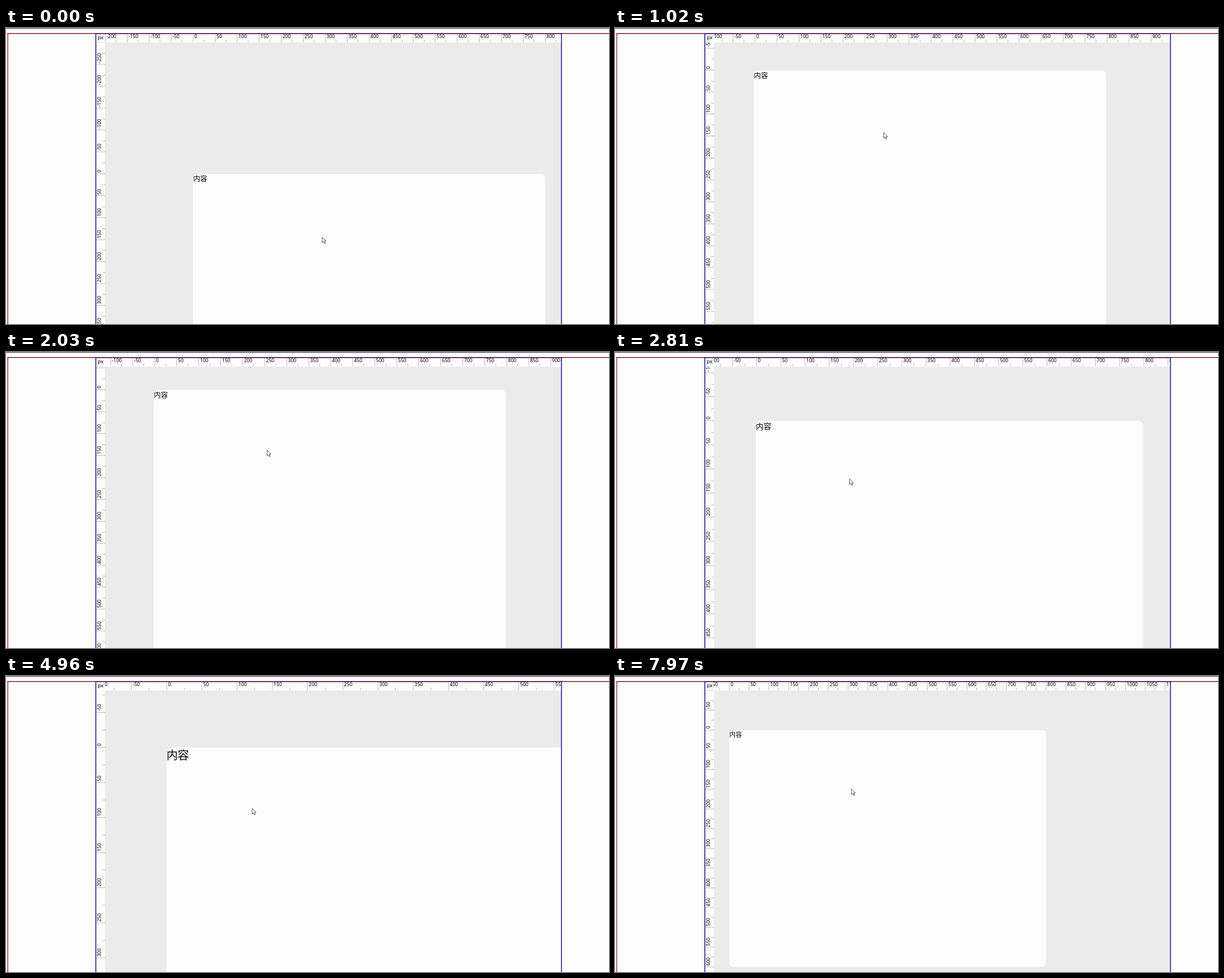
An HTML page with a canvas that plays this animation: 1066x525 px, repeating every 8000 ms.

```html
<!DOCTYPE html>
<html lang="zh">
<head>
<meta charset="utf-8">
<title>Canvas ruler</title>
<style>
  html, body { margin: 0; width: 100%; height: 100%; overflow: hidden; background: #fdfdfd; }
  canvas { display: block; }
</style>
</head>
<body>
<canvas id="stage" width="1066" height="525"></canvas>
<script>
const ctx = document.getElementById('stage').getContext('2d');
const LOOP = 8000, UNIT = 0.778, WHITE = '#fdfdfd';
const LEFT = 175, TOP = 25.5, RIGHT = 981, BOTTOM = 525;

// Key points of the drag: page corner and pointer
const keys = [
  { at: 0, page: [331, 259], pointer: [559, 371] },
  { at: 530, page: [235.5, 131.5], pointer: [462.5, 241] },
  { at: 1510, page: [265.5, 44.5], pointer: [490, 155] },
  { at: 2810, page: [249, 122], pointer: [414.7, 225] },
  { at: 4190, page: [251.7, 128.5], pointer: [458, 246.7] },
  { at: 6470, page: [331, 119], pointer: [384, 205.5] },
  { at: 7970, page: [202, 96], pointer: [418, 200.3] }
];

const clamp = (v, lo, hi) => Math.min(hi, Math.max(lo, v));

// The hand rests twice, for 160 ms each
const movingTime = t => t - clamp(t - 3500, 0, 160) - clamp(t - 5740, 0, 160);

// Wheel notches turned so far, each of them a hard step
const notches = (t, start, gap, count) => clamp(Math.floor((t - start) / gap) + 1, 0, count);
const zoomAt = t => 1 + (notches(t, 2440, 1, 1) + notches(t, 3290, 100, 5) - notches(t, 6710, 120, 7)) / 10;

// The horizontal ruler lags behind the page, less and less
const rulerLag = t => Math.min(t / 250, 2.3 * Math.max(0, 1 - t / 6470));

// Catmull-Rom spline through the key points
function position(part, t) {
  const last = keys.length - 1;
  t = Math.min(t, keys[last].at);
  const next = Math.max(1, keys.findIndex(key => key.at >= t));
  const start = movingTime(keys[next - 1].at), end = movingTime(keys[next].at);
  const u = (movingTime(t) - start) / (end - start);
  const [a, b, c, d] = [-2, -1, 0, 1].map(k => keys[clamp(next + k, 0, last)][part]);
  return b.map((p, i) => p + u / 2 * (c[i] - a[i]
    + u * (2 * a[i] - 5 * p + 4 * c[i] - d[i] + u * (3 * (p - c[i]) + d[i] - a[i]))));
}

function rect(color, x, y, w, h) {
  ctx.fillStyle = color;
  ctx.fillRect(x, y, w, h);
}

function text(str, x, y, size, family = '"Noto Sans", "Open Sans", sans-serif') {
  ctx.fillStyle = '#000';
  ctx.font = `${size}px ${family}`;
  ctx.fillText(str, x, y);
}

function clipped(x, y, w, h, paint) {
  ctx.save();
  ctx.beginPath();
  ctx.rect(x, y, w, h);
  ctx.clip();
  paint();
  ctx.restore();
}

function ruler(origin, scale, from, to, vertical) {
  const step = 25 * scale;
  const first = Math.floor((from - origin) / step) - 2;
  const final = Math.ceil((to - origin) / step) + 2;
  for (let n = first; n <= final; n++) {
    const pos = origin + n * step, major = n % 2 === 0, length = major ? 15 : 5;
    if (vertical) rect('#aaaab0', LEFT - length, pos - 0.4, length, 0.8);
    else rect('#aaaab0', pos - 0.4, TOP - length, 0.8, length);
    if (!major) continue;
    ctx.save();
    if (vertical) {
      ctx.translate(168.3, pos - 2.2);
      ctx.rotate(-Math.PI / 2);
    } else ctx.translate(pos + 2.2, 18.4);
    text(String(n * 25), 0, 0, 11 * UNIT);
    ctx.restore();
  }
}

function sheet(x, y, scale) {
  ctx.fillStyle = WHITE;
  ctx.beginPath();
  ctx.roundRect(x, y, 800 * scale, 600 * scale, 10 * scale);
  ctx.fill();
  text('内容', x, y + 17.3 * scale, 16 * scale, '"Noto Sans CJK SC", "Noto Sans CJK", sans-serif');
}

function arrow(x, y) {
  ctx.save();
  ctx.translate(x, y);
  const shape = new Path2D('M0 0V10L2.3 7.9 3.9 11.5 5.5 10.8 3.9 7.3 6.9 7.1Z');
  ctx.fillStyle = '#fff';
  ctx.fill(shape);
  ctx.strokeStyle = '#2a2a2a';
  ctx.lineWidth = 0.8;
  ctx.stroke(shape);
  ctx.restore();
}

function borders() {
  rect('#2f2a36', 0, 0, 1066, 1);
  rect('#7b1b30', 2.5, 9, 1064, 1.5);
  rect('#861c2c', 2.5, 9, 1.3, 516);
  rect('#4c185c', 158, 9, 825, 1.5);
  for (const x of [158, 981.2]) rect('#14148a', x, 9, 1.5, 516);
}

function draw(t) {
  const [x, y] = position('page', t);
  const scale = UNIT * zoomAt(t);
  rect(WHITE, 0, 0, 1066, 525);
  clipped(LEFT, TOP, RIGHT - LEFT, BOTTOM - TOP, () => {
    rect('#ebebeb', LEFT, TOP, RIGHT - LEFT, BOTTOM - TOP);
    sheet(x, y, scale);
  });
  clipped(174, 10, RIGHT - 174, TOP - 10, () => ruler(x + rulerLag(t), scale, LEFT, RIGHT, false));
  clipped(159, TOP, LEFT - 159, BOTTOM - TOP, () => ruler(y - 0.2, scale, TOP, BOTTOM, true));
  text('px', 162, 19.8, 12 * UNIT);
  borders();
  arrow(...position('pointer', t));
}

function tick() {
  draw(performance.now() % LOOP);
  requestAnimationFrame(tick);
}
tick();
</script>
</body>
</html>
```
